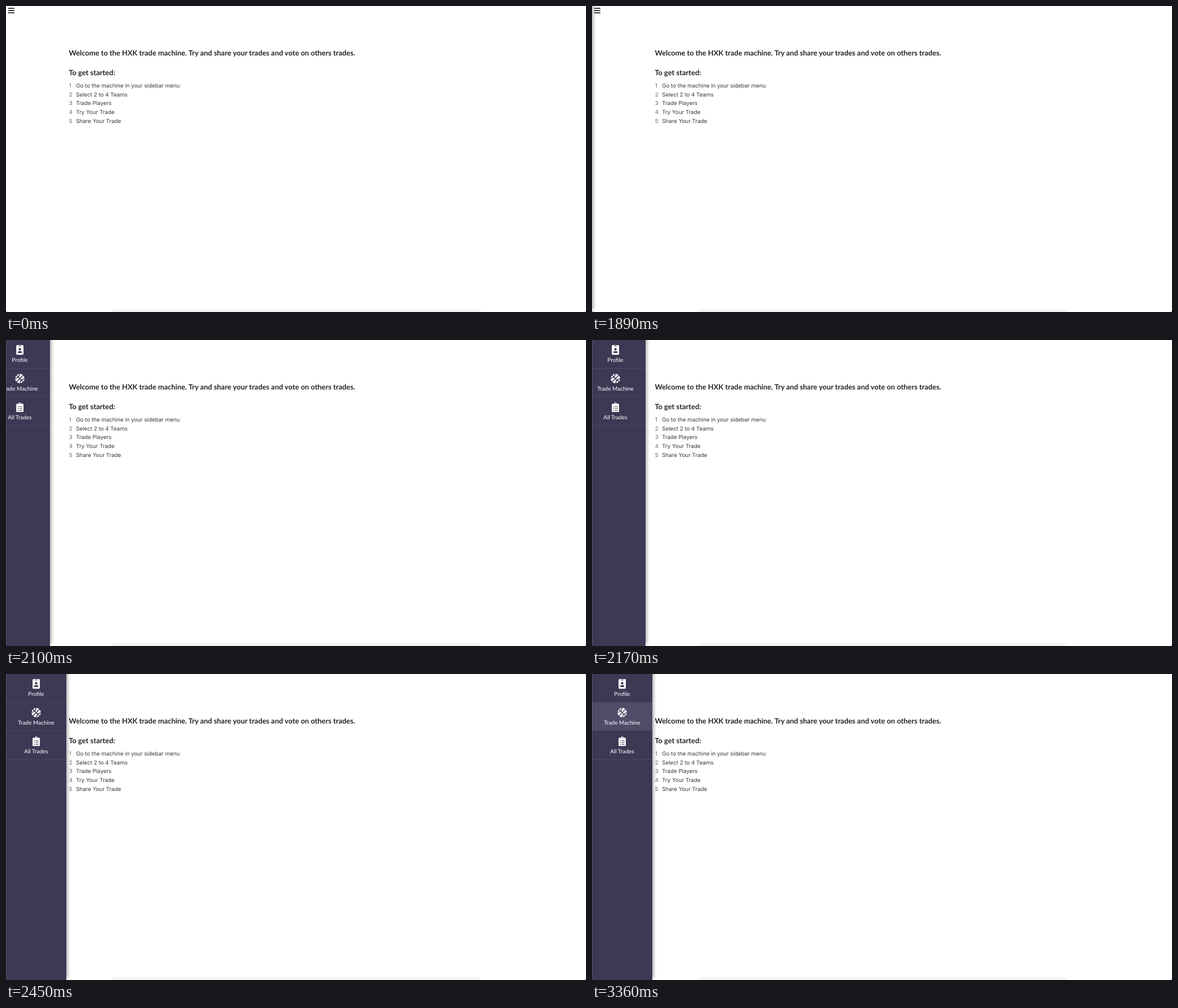
An HTML page for the animation above (3500 ms loop, 1029 by 544 pixels).

```html
<!DOCTYPE html>
<html lang="en">
<head>
<meta charset="utf-8">
<title>Trade machine</title>
<style>
  html, body { margin: 0; width: 100%; height: 100%; overflow: hidden; background: #fff; }
  body { text-rendering: geometricPrecision; }
  svg { position: absolute; left: 0; top: 0; display: block; }
  h3, li, .item span { position: absolute; margin: 0; white-space: nowrap; }
  h3 { left: 111.4px; font: 700 12.88px/16px Lato, sans-serif; color: #23222a; }
  ol { margin: 0; padding: 0; list-style: none; }
  li {
    left: 124.2px; font: 400 9.8px/16px Inter, "Liberation Sans", sans-serif;
    letter-spacing: -.02px; color: rgba(0, 0, 0, .78);
  }
  li b { position: absolute; left: -12.4px; font-weight: 400; opacity: .75; }
  #side {
    position: absolute; left: 0; top: 0; width: 107px; height: 544px;
    background: #3d3854; box-shadow: 2px -4px 6px rgba(0, 0, 0, .38);
  }
  .item {
    position: absolute; left: 0; width: 107px; height: 50.7px; box-sizing: border-box;
    border-bottom: 1px solid #4c4862; background: var(--bg);
  }
  .item span {
    left: 0; width: 107px; top: 28.4px; text-align: center;
    font: 400 10px/16px Lato, sans-serif; color: #fff;
  }
  .item svg { left: 44.9px; top: 9.4px; width: 17.2px; height: 17.2px; fill: #fff; }
  .item .gap { fill: var(--bg); }
  .item .seam { fill: none; stroke: var(--bg); stroke-width: 46; }
</style>
</head>
<body>
<svg width="1029" height="544">
  <path d="M3.8 4.1H14.9M3.8 8.1H14.9M3.8 12.1H14.9" stroke="#222" stroke-width="1.75"/>
  <path d="M186 544Q190 538.5 198 538.5H832Q840 538.5 844 544Z" fill="#f3f3f3"/>
</svg>
<h3 style="top:75px">Welcome to the HXK trade machine. Try and share your trades and vote on others trades.</h3>
<h3 style="top:110px">To get started:</h3>
<ol id="steps"></ol>
<div id="side"></div>
<svg width="1029" height="544">
  <path d="M.5 0V544" stroke="#fff" stroke-opacity=".15"/>
  <path d="M0 541.5Q0 544 2.5 544H0ZM1029 541.5Q1029 544 1026.5 544H1029Z" fill="#111"/>
</svg>
<script>
  const LOOP = 3500, WIDTH = 107;

  const steps = [
    'Go to the machine in your sidebar menu', 'Select 2 to 4 Teams',
    'Trade Players', 'Try Your Trade', 'Share Your Trade'
  ];
  const badge = `<rect x="64" width="384" height="512" rx="48"/>
    <g class="gap"><rect x="192" y="32" width="128" height="32" rx="16"/>
    <circle cx="256" cy="224" r="64"/>
    <path d="M144 397V378Q150 322 216 320Q256 336 296 320Q362 322 368 378V397Q366 416 346 416H166Q146 416 144 397Z"/></g>`;
  const ball = `<circle cx="256" cy="256" r="248"/>
    <g class="seam" transform="translate(256 256)"><path d="M-180 -180L180 180M180 -180L-180 180"/>
    <path d="M-12 -256Q-30 -30 -256 -12M12 256Q30 30 256 12"/></g>`;
  const row = y => `<circle cx="160" cy="${y}" r="24"/><rect x="216" y="${y - 16}" width="168" height="32" rx="8"/>`;
  const clipboard = `<rect x="64" y="64" width="384" height="448" rx="48"/><circle cx="256" cy="64" r="64"/>
    <g class="gap"><circle cx="256" cy="64" r="24"/>${[232, 328, 424].map(row).join('')}</g>`;
  const menu = [['Profile', badge], ['Trade Machine', ball], ['All Trades', clipboard]];

  document.getElementById('steps').innerHTML = steps.map((text, i) =>
    `<li style="top:${134.8 + i * 15.72}px"><b>${i + 1}</b>${text}</li>`).join('');

  const side = document.getElementById('side');
  side.innerHTML = menu.map(([label, icon], i) =>
    `<div class="item" style="top:${i * 50.7}px"><svg viewBox="0 0 512 512">${icon}</svg><span>${label}</span></div>`).join('');
  const items = [...side.children];

  // [start time, value], each held until the next
  const edge = [[0, -1], [1890, 0], [1960, 20], [2030, 53], [2100, 78], [2170, 95], [2310, 104.4], [2380, 106.2], [2450, WIDTH]];
  const hover = [
    [[0, 0], [3010, .5], [3080, 1], [3360, 0]],
    [[0, 0], [3360, 1]],
    [[0, 0]]
  ];
  const at = (track, t) => track.filter(([start]) => start <= t).pop()[1];
  const shade = k => `rgb(${[61, 56, 84].map(c => Math.round(c + 19 * k)).join()})`;

  function draw(now) {
    const t = now % LOOP, x = at(edge, t);
    side.style.visibility = x < 0 ? 'hidden' : 'visible';
    side.style.transform = `translateX(${x - WIDTH}px)`;
    items.forEach((item, i) => item.style.setProperty('--bg', shade(at(hover[i], t))));
  }

  const begin = performance.now();
  function tick() {
    draw(performance.now() - begin);
    requestAnimationFrame(tick);
  }
  tick();
</script>
</body>
</html>
```
